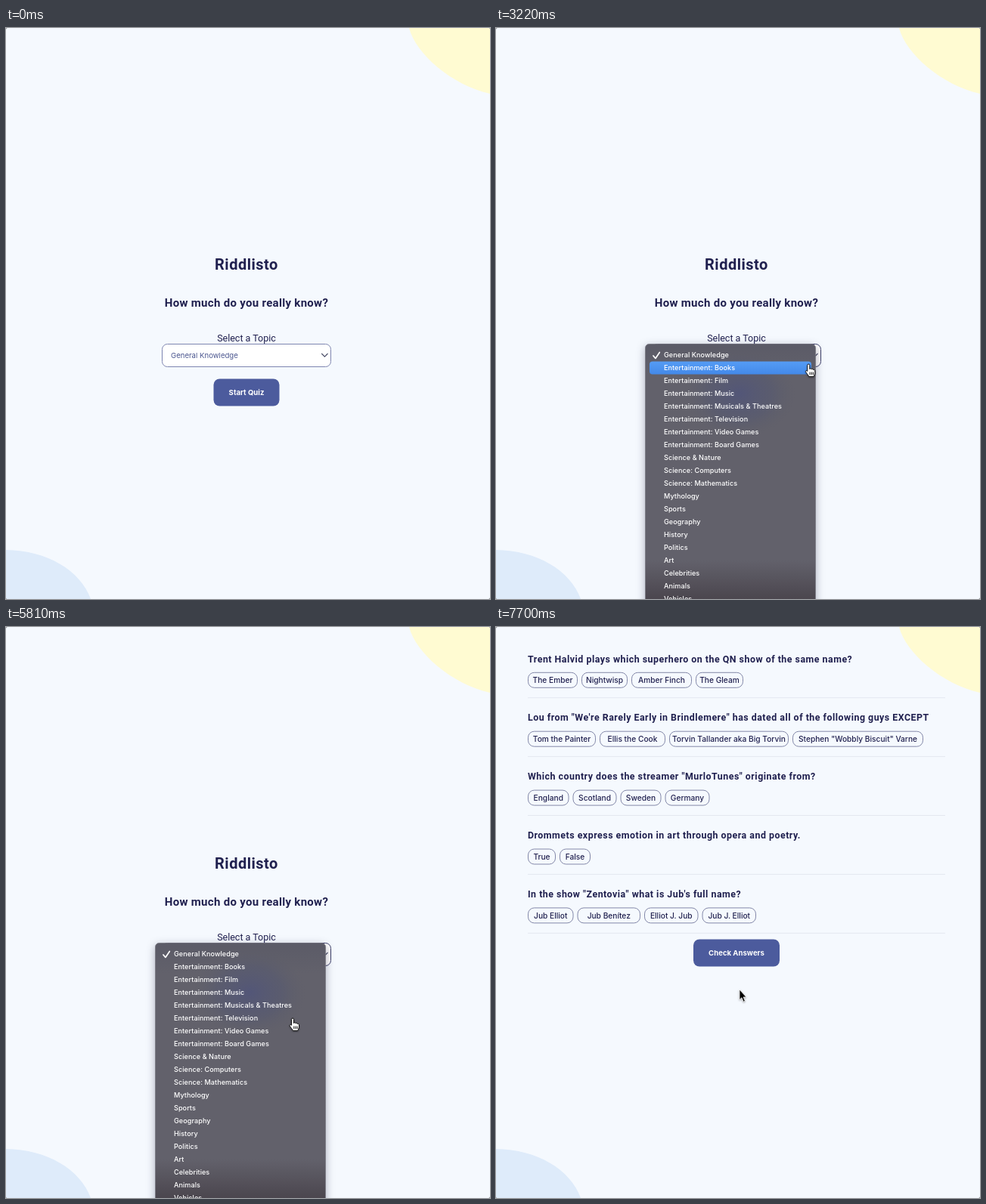
An HTML page for the animation above (8 s loop, 640 by 756 pixels).

```html
<!DOCTYPE html>
<html lang="en">
<head>
<meta charset="utf-8">
<title>Quiz</title>
<style>
  html, body { margin: 0; height: 100%; overflow: hidden; background: #6b6d70; }
  svg { display: block; width: 640px; height: 756px; border-radius: 2px; background: #f5f9fe; }
  text { fill: #20204f; white-space: pre; }
  .title, .sub, .question { font-family: Roboto, sans-serif; font-weight: 700; }
  .title { font-size: 20px; letter-spacing: .5px; }
  .sub { font-size: 15px; letter-spacing: .3px; }
  .question { font-size: 12.4px; letter-spacing: .5px; }
  .label { font: 12.5px Roboto, sans-serif; }
  .value { font: 9.6px Inter, sans-serif; fill: #4b568f; }
  .item { font: 500 9.1px Inter, sans-serif; letter-spacing: .05px; fill: #fff; }
  .answer { font: 500 10.2px Inter, sans-serif; }
  .action { font: 700 9.6px Inter, sans-serif; fill: #fff; }
  .button { fill: #4c5b9d; }
  .pill { fill: none; stroke: #767b9f; stroke-width: .9; }
  .rule { stroke: #e4e8f0; }
  .mid { text-anchor: middle; }
  #menu { filter: drop-shadow(0 3px 6px rgba(30, 30, 60, .35)); }
  #cursor { filter: drop-shadow(0 1px 1px rgba(0, 0, 0, .35)); }
</style>
</head>
<body>
<svg viewBox="0 0 640 756">
  <defs>
    <linearGradient id="panel" gradientUnits="userSpaceOnUse" x1="0" y1="418" x2="0" y2="756">
      <stop offset="0" stop-color="#5b5b67"/>
      <stop offset=".12" stop-color="#62616b"/>
      <stop offset=".85" stop-color="#62616b"/>
      <stop offset="1" stop-color="#4b464e"/>
    </linearGradient>
    <radialGradient id="glow">
      <stop offset="0" stop-color="#50547a" stop-opacity=".85"/>
      <stop offset=".6" stop-color="#565970" stop-opacity=".6"/>
      <stop offset="1" stop-color="#5d5d69" stop-opacity="0"/>
    </radialGradient>
    <linearGradient id="blue" x2="0" y2="1">
      <stop offset="0" stop-color="#559cf5"/>
      <stop offset="1" stop-color="#4389e9"/>
    </linearGradient>
  </defs>

  <path fill="#fffbd2" d="M533 0C542 34 588 75 640 87V0z"/>
  <path fill="#deebfa" d="M0 691C55 692 98 718 112 756H0z"/>

  <g id="start">
    <text class="title mid" x="318" y="319.5">Riddlisto</text>
    <text class="sub mid" x="318" y="368.7">How much do you really know?</text>
    <text class="label mid" x="318" y="415.2">Select a Topic</text>
    <rect id="select" x="206.5" y="418.5" width="223" height="30" rx="7" fill="#fff"/>
    <text id="value" class="value" x="218" y="436.6"></text>
    <path d="M417.3 431l4.1 4.2 4.1-4.2" fill="none" stroke="#484b66" stroke-width="1.1"/>
    <rect class="button" x="274.5" y="464.5" width="87" height="36" rx="8"/>
    <text class="action mid" x="318" y="486">Start Quiz</text>
  </g>

  <g id="quiz">
    <rect class="button" x="261" y="413.5" width="114" height="36" rx="8"/>
    <text class="action mid" x="318" y="435">Check Answers</text>
  </g>

  <g id="menu">
    <rect x="197.5" y="418.5" width="225" height="350" rx="5" fill="url(#panel)" stroke="#77767f" stroke-width=".8"/>
    <ellipse cx="322" cy="484" rx="74" ry="58" fill="url(#glow)"/>
    <rect id="highlight" x="203" width="214" height="17" rx="4" fill="url(#blue)"/>
    <path d="M208 434l2.9 3.4 5.4-8" fill="none" stroke="#fff" stroke-width="1.7" stroke-linecap="round" stroke-linejoin="round"/>
  </g>

  <g id="ring" fill="none">
    <circle stroke="#fff" stroke-width="3"/>
    <circle stroke="#080808" stroke-width="1.6"/>
  </g>
  <g id="cursor" stroke-linejoin="round">
    <path id="arrow" fill="#000" stroke="#fff" stroke-width=".8" d="M0 0v13.6l2.9-2.8 2.3 5.4 2.2-1-2.3-5.2h3.9z"/>
    <path id="hand" fill="#fff" stroke="#111" d="M-1.5 1.5a1.5 1.5 0 0 1 3 0v5c.3-1 2.4-1 2.6.3c.6-.7 2.3-.4 2.4.8c.7-.5 2 0 2 1.2v3c0 2-1.5 2.6-1.6 4.7h-6.6c-.3-2-2.5-3.6-3.9-6c-1-1.8.7-2.6 2.1-1.2zM1.8 10.5v3.5M4 10.5v3.5M6.1 10.5v3.5"/>
  </g>
</svg>
<script>
const LOOP = 8000, STEP = 70, ROW = 17, MENU_TOP = 424.5;
const $ = id => document.getElementById(id);

function add(parent, tag, attrs, content = '') {
  const el = document.createElementNS('http://www.w3.org/2000/svg', tag);
  for (const key in attrs) el.setAttribute(key, attrs[key]);
  el.textContent = content;
  parent.append(el);
}

const topics = ['General Knowledge',
  ...['Books', 'Film', 'Music', 'Musicals & Theatres', 'Television', 'Video Games', 'Board Games']
    .map(name => 'Entertainment: ' + name),
  'Science & Nature', 'Science: Computers', 'Science: Mathematics', 'Mythology', 'Sports',
  'Geography', 'History', 'Politics', 'Art', 'Celebrities', 'Animals', 'Vehicles'];
topics.forEach((name, i) =>
  add($('menu'), 'text', { class: 'item', x: 222, y: 436.2 + i * ROW }, name));

// Each answer is [label, pill width].
const questions = [
  ['Trent Halvid plays which superhero on the QN show of the same name?',
    ['The Ember', 66], ['Nightwisp', 61], ['Amber Finch', 80], ['The Gleam', 63]],
  ['Lou from "We\'re Rarely Early in Brindlemere" has dated all of the following guys EXCEPT',
    ['Tom the Painter', 90], ['Ellis the Cook', 87], ['Torvin Tallander aka Big Torvin', 158],
    ['Stephen "Wobbly Biscuit" Varne', 173]],
  ['Which country does the streamer "MurloTunes" originate from?',
    ['England', 54.5], ['Scotland', 58], ['Sweden', 54], ['Germany', 59]],
  ['Drommets express emotion in art through opera and poetry.',
    ['True', 37], ['False', 41]],
  ['In the show "Zentovia" what is Jub\'s full name?',
    ['Jub Elliot', 60.5], ['Jub Benítez', 83.5], ['Elliot J. Jub', 71.5], ['Jub J. Elliot', 71.5]]
];
questions.forEach(([question, ...answers], i) => {
  const quiz = $('quiz'), y = i * 77.9;
  let x = 42;
  add(quiz, 'text', { class: 'question', x, y: y + 46.5 }, question);
  for (const [label, width] of answers) {
    add(quiz, 'rect', { class: 'pill', x: x + .5, y: y + 60.3, width: width - 1, height: 20, rx: 8 });
    add(quiz, 'text', { class: 'answer mid', x: x + width / 2, y: y + 74 }, label);
    x += width + 5;
  }
  add(quiz, 'path', { class: 'rule', d: `M42 ${y + 93.7}H594` });
});

// Pointer path: time, x, y
const path = [
  [280, 350, 665], [910, 408, 455], [1120, 408, 455], [1260, 422, 433], [2730, 422, 433],
  [2870, 421, 435], [3010, 420, 437], [3920, 391, 472], [5040, 380, 508.5], [5670, 379, 518],
  [6580, 379, 518], [7210, 322, 480], [LOOP, 322, 480]
];

function pointerAt(t) {
  const i = Math.max(1, path.findIndex(p => p[0] >= t));
  const [t0, x0, y0] = path[i - 1], [t1, x1, y1] = path[i];
  const k = Math.max(0, (t - t0) / (t1 - t0));
  return [x0 + (x1 - x0) * k, y0 + (y1 - y0) * k];
}

function ringRadius(t) {
  if (t >= 1470 && t < 1680) return Math.min(22, 15 + (t - 1470) / 10);
  if (t >= 2380 && t < 2520) return t < 2450 ? 25 : 30.5;
  if (t >= 7350 && t < 7560) return 30.5;
  return 0;
}

const show = (id, on) => $(id).style.display = on ? '' : 'none';

function draw(t) {
  const [x, y] = pointerAt(t);
  const within = (from, to) => t >= from && t < to;
  const menuOpen = within(2380, 6160), quizOpen = t >= 7630;

  show('start', !quizOpen);
  show('quiz', quizOpen);
  show('menu', menuOpen);
  $('menu').style.opacity = Math.max(0, Math.min(1, 1 - (t - 5940) / 220));
  show('highlight', !within(5810, 5880));
  const row = Math.max(0, Math.floor((y - MENU_TOP) / ROW));
  $('highlight').setAttribute('y', MENU_TOP + row * ROW);
  $('value').textContent = topics[t < 6160 ? 0 : 5];
  $('select').setAttribute('stroke', within(2380, 7350) ? '#3a3d68' : '#7e85b0');

  const hand = menuOpen || (t > 6580 && t < 7630 && y < 500);
  show('cursor', t >= 280);
  show('hand', hand);
  show('arrow', !hand);
  $('cursor').setAttribute('transform', `translate(${x} ${y})`);

  const radius = ringRadius(t);
  show('ring', radius > 0);
  $('ring').setAttribute('transform', `translate(${x} ${y})`);
  for (const circle of $('ring').children) circle.setAttribute('r', radius);
}

function frame() {
  const t = performance.now() % LOOP;
  draw(Math.floor(t / STEP) * STEP);
  requestAnimationFrame(frame);
}
frame();
</script>
</body>
</html>
```
